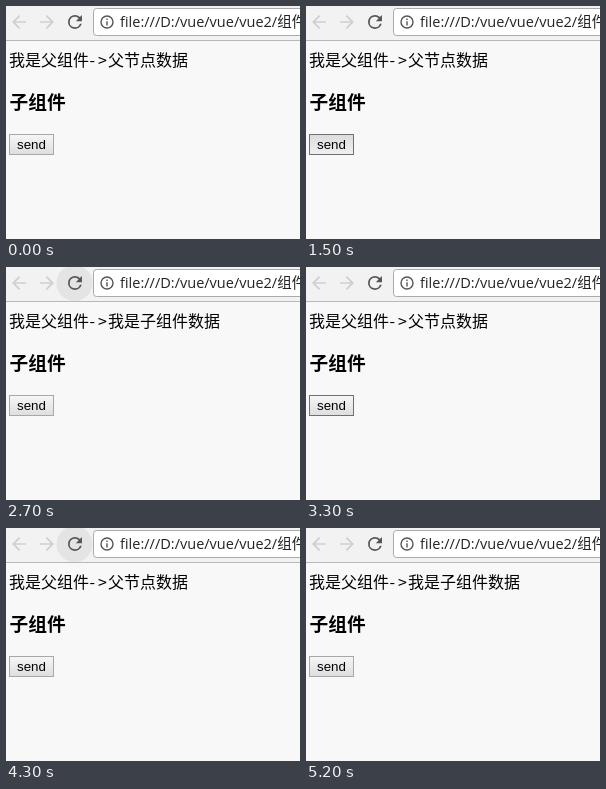
An HTML page for the animation above (5900 ms loop, 294x233 px).

```html
<!DOCTYPE html>
<html lang="zh-CN">
<head>
<meta charset="utf-8">
<style>
  html, body { margin: 0; width: 100%; height: 100%; overflow: hidden; background: #f8f8f8; }
  svg { display: block; }
  text { font-family: "Noto Sans CJK SC", "Noto Sans CJK", sans-serif; }
  .url { font: 14.5px "Open Sans", "Noto Sans CJK SC", "Noto Sans CJK", sans-serif; fill: #222; }
  .label { font: 13.333px "Liberation Sans", Arial, sans-serif; }
</style>
</head>
<body>
<svg width="294" height="233" viewBox="0 0 294 233">
  <defs>
    <linearGradient id="up" x2="0" y2="1"><stop stop-color="#f6f6f6"/><stop offset="1" stop-color="#dedede"/></linearGradient>
    <linearGradient id="down" x2="0" y2="1"><stop stop-color="#dcdcdc"/><stop offset="1" stop-color="#f0f0f0"/></linearGradient>
    <path id="arrow" d="M8-1H-4.2L1.4-6.6 0-8-8 0 0 8 1.4 6.6-4.2 1H8z"/>
  </defs>

  <rect width="294" height="34" fill="#f2f2f2"/>
  <circle id="halo" cx="68.5" cy="16"/>
  <rect y="34" width="294" height="1" fill="#b8b8b8"/>
  <use href="#arrow" transform="translate(13 16) scale(.87)" fill="#cfcfcf"/>
  <use href="#arrow" transform="translate(41 16) scale(-.87 .87)" fill="#cfcfcf"/>
  <path transform="translate(69 16) scale(.87) translate(-12 -12)" fill="#555"
    d="M17.65 6.35A7.96 7.96 0 0 0 12 4a8 8 0 1 0 7.73 10h-2.08A6 6 0 1 1 12 6c1.66 0 3.14.69 4.22 1.78L13 11h7V4z"/>
  <rect x="87.5" y="2.5" width="220" height="27" rx="3" fill="#fff" stroke="#aaa"/>
  <g fill="none" stroke="#555" stroke-width="1.4">
    <circle cx="101" cy="16" r="6"/>
    <path d="M101 12.5v1.5M101 15.2v4.3"/>
  </g>
  <text class="url" x="114" y="21">file:///D:/vue/vue/vue2/组件</text>

  <text y="60" font-size="16"><tspan x="3">我是父组件</tspan><tspan x="83.5">-</tspan><tspan x="92">&gt;</tspan><tspan x="102" id="data"></tspan></text>
  <text x="3.5" y="103" font-size="18.72" font-weight="700">子组件</text>
  <rect id="button" x="3.5" y="128.5" width="44" height="20"/>
  <text class="label" x="11" y="143">send</text>
</svg>
<script>
  const LOOP = 5900;
  const $ = id => document.getElementById(id);
  const set = (id, attrs) => {
    for (const name in attrs) $(id).setAttribute(name, attrs[name]);
  };

  // Each track lists [start time, value]; values hold until the next entry.
  const textTrack = [[0, '父节点数据'], [1600, '我是子组件数据'], [2800, '父节点数据'],
    [3600, '我是子组件数据'], [4300, '父节点数据'], [5100, '我是子组件数据']];
  const buttonTrack = [[0, 'idle'], [1400, 'hover'], [1500, 'press'], [1600, 'hover'], [2100, 'idle'],
    [3300, 'hover'], [3500, 'press'], [3600, 'hover'], [3700, 'idle'],
    [4800, 'hover'], [5000, 'press'], [5100, 'hover'], [5200, 'idle']];
  const haloTrack = [[0, 'idle'], [500, 'hover'], [700, 'press'], [900, 'idle'],
    [2600, 'hover'], [2700, 'press'], [2800, 'idle'],
    [4100, 'hover'], [4200, 'press'], [4800, 'idle']];

  const buttonLook = {
    idle: { fill: 'url(#up)', stroke: '#a8a8a8' },
    hover: { fill: 'url(#up)', stroke: '#707070' },
    press: { fill: 'url(#down)', stroke: '#707070' }
  };
  const haloLook = {
    idle: { r: 0 },
    hover: { r: 12, fill: '#ebebeb' },
    press: { r: 18, fill: '#e4e4e4' }
  };

  const at = (track, t) => track.filter(([start]) => start <= t).pop()[1];

  function draw(now) {
    const t = now % LOOP;
    $('data').textContent = at(textTrack, t);
    set('button', buttonLook[at(buttonTrack, t)]);
    set('halo', haloLook[at(haloTrack, t)]);
    requestAnimationFrame(draw);
  }
  draw(0);
</script>
</body>
</html>
```
